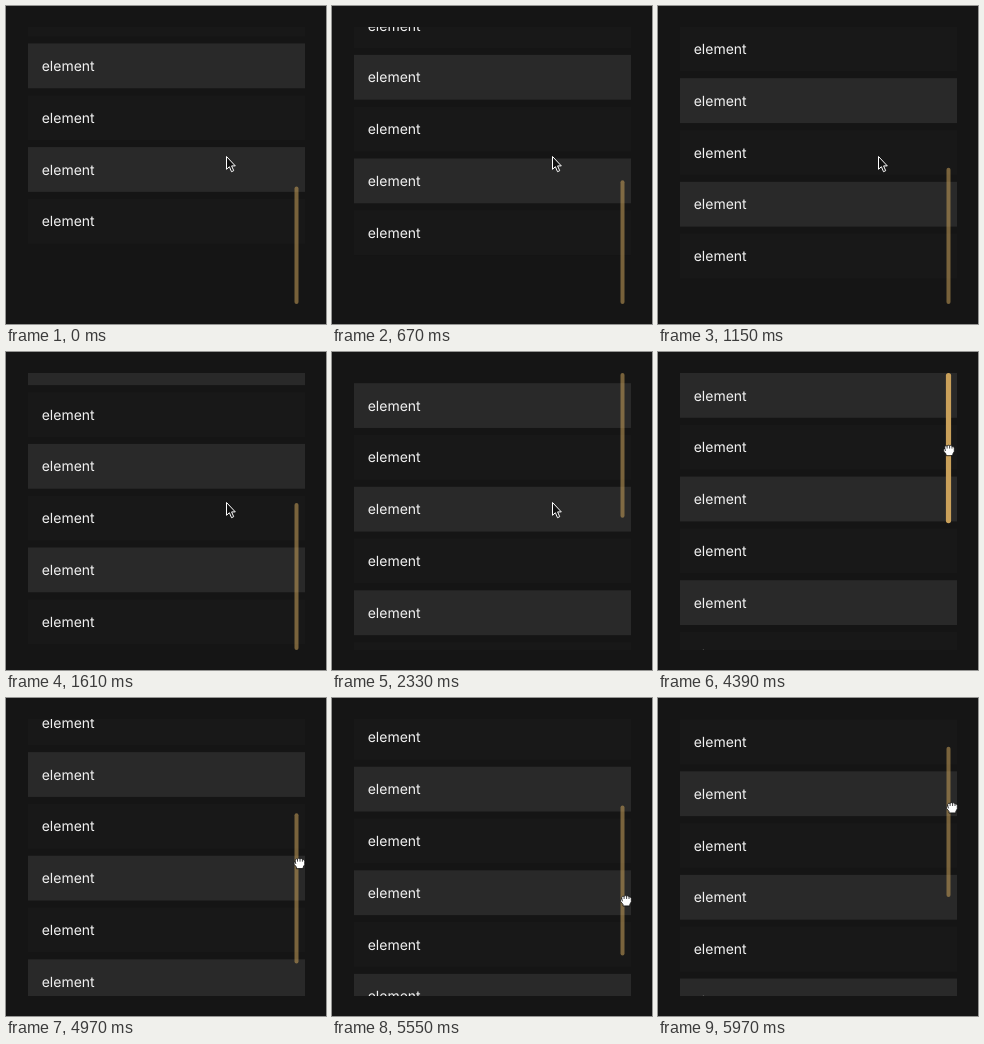
These frames come from a looping animation (320 by 318 pixels, 6 s). An HTML page:

```html
<!DOCTYPE html>
<html lang="en">
<head>
<meta charset="utf-8">
<title>Elastic scroll list</title>
<style>
html, body { margin: 0; width: 100%; height: 100%; overflow: hidden; background: #151515; }
svg { display: block; width: 100vw; height: 100vh; }
text { font: 14px Inter, "Liberation Sans", sans-serif; fill: #f2f2f2; text-rendering: geometricPrecision; }
</style>
</head>
<body>
<svg viewBox="0 0 320 318">
  <defs><clipPath id="view"><rect x="22" y="21" width="277" height="277"/></clipPath></defs>
  <g clip-path="url(#view)"><g id="list"></g></g>
  <rect id="thumb" fill="#c9a05a"/>
  <path id="arrow" d="M0 0V12.8L2.9 10.2L5 15.2L7.2 14.2L5.1 9.4H8.8Z"
    fill="#111" stroke="#fff" stroke-linejoin="round"/>
  <g id="hand" stroke="#111" stroke-width=".8" stroke-linejoin="round" stroke-linecap="round">
    <path fill="#fff" d="M-3 5.5V4.2L-5.3 1.4Q-6-1-4.2-1.4V-3Q-3.4-4.6-2-3.8Q-.8-5.2.5-4.1Q1.9-5 3-3.5Q5.2-3.7 5.3-1.6V1.6L3.8 4.2V5.5Z"/>
    <path fill="none" d="M-1.9-3.4V-1.6M.6-3.7V-1.6M3-3.1V-1.6M-4.2-1.4L-3.6.8"/>
  </g>
</svg>
<script>
const LOOP = 6000, VIEW = 277, TOP = 21, BOTTOM = TOP + VIEW;
const ROWS = 10, PITCH = 51.8, ROW = 44.8;
const CONTENT = (ROWS - 1) * PITCH + ROW;
const MAX = CONTENT - VIEW, RATIO = VIEW / CONTENT;

const FLING = 1880, TOP_PULL = 2430, REST = 3740;
const GRAB = 4220, DRAG = 4450, FIRST_LOW = 4871;
const SWING = 807, HAND_LEAD = 80;

const mix = (a, b, u) => a + (b - a) * u;

function ease(t, from, to) {
  const u = Math.min(1, Math.max(0, (t - from) / (to - from)));
  return u * u * (3 - 2 * u);
}

// Elastic pull that peaks at 1 and relaxes to 0 after the given width
const pull = (t, peak, width) => Math.cos(Math.PI / 2 * (t - peak) / width) ** 2;

// The thumb is pulled down once, then swung up and down
function dragScroll(t) {
  if (t < FIRST_LOW) return 200 * ease(t, DRAG, FIRST_LOW);
  return 110 + 90 * Math.cos(2 * Math.PI * (t - FIRST_LOW) / SWING);
}

function scrollAt(t) {
  if (t < FLING) return MAX + 61 * pull(t, 125, 1860);
  if (t < TOP_PULL) return mix(MAX, -33, ease(t, FLING, TOP_PULL));
  if (t < REST) return -33 * pull(t, TOP_PULL, REST - TOP_PULL);
  return dragScroll(t);
}

function cursorAt(t) {
  const reach = ease(t, REST, GRAB);
  return {
    x: mix(220.5, 291, reach) + 3 * ease(t, 4390, 5200),
    y: mix(150.5, 97, reach) + (t > GRAB ? RATIO * dragScroll(t + HAND_LEAD) : 0)
  };
}

const byId = id => document.getElementById(id);
const list = byId("list"), thumb = byId("thumb"), arrow = byId("arrow"), hand = byId("hand");

function set(el, attrs) {
  for (const name in attrs) el.setAttribute(name, attrs[name]);
  return el;
}

function add(parent, tag, attrs) {
  const el = document.createElementNS("http://www.w3.org/2000/svg", tag);
  return parent.appendChild(set(el, attrs));
}

for (let i = 0; i < ROWS; i++) {
  const y = i * PITCH;
  add(list, "rect", { x: 22, y, width: 277, height: ROW, fill: i % 2 ? "#181818" : "#292929" });
  add(list, "text", { x: 35.7, y: y + 27.5 }).textContent = "element";
}

function render(t) {
  const scroll = scrollAt(t);
  const inside = Math.min(MAX, Math.max(0, scroll));
  const over = Math.abs(scroll - inside);
  set(list, { transform: `translate(0 ${TOP - scroll})` });

  const hover = ease(t, 4180, 4290) - ease(t, 4470, 4620);
  const height = (VIEW - over) * RATIO;
  const y = scroll > MAX ? BOTTOM - height : TOP + inside * RATIO;
  const width = 4 + 1.2 * hover;
  set(thumb, { x: 290.5 - width / 2, y, width, height, rx: width / 2, opacity: 0.55 + 0.45 * hover });

  const cursor = cursorAt(t);
  const transform = `translate(${cursor.x} ${cursor.y})`;
  const grabbing = t >= GRAB;
  set(arrow, { transform, visibility: grabbing ? "hidden" : "visible" });
  set(hand, { transform, visibility: grabbing ? "visible" : "hidden" });
}

const start = performance.now();
function tick() {
  render((performance.now() - start) % LOOP);
  requestAnimationFrame(tick);
}
render(0);
requestAnimationFrame(tick);
</script>
</body>
</html>
```
